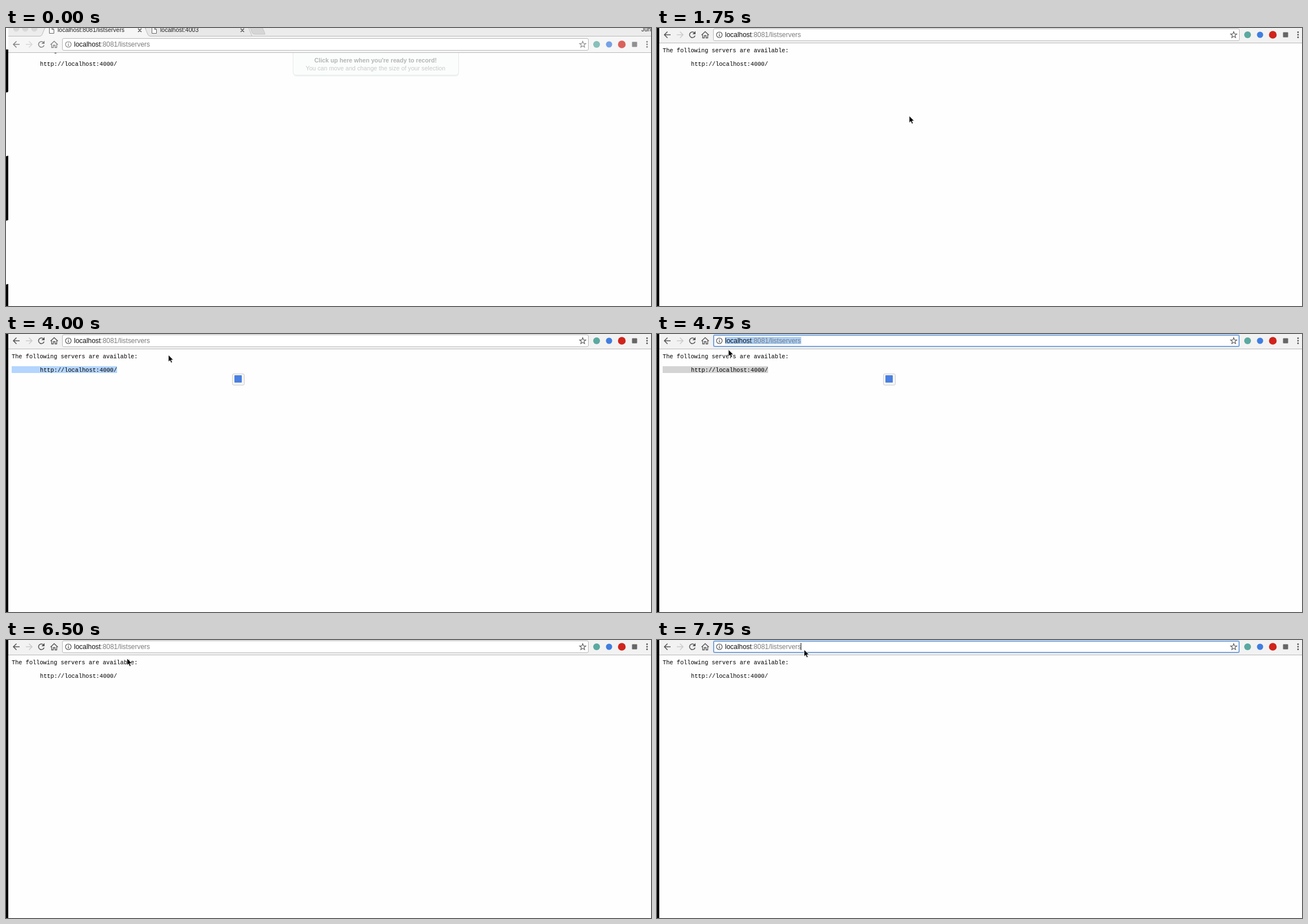
Recreate the animation shown at these times as an HTML page. Size 1138x492 px, loop 8 s.

```html
<!DOCTYPE html>
<html lang="en">
<head>
<meta charset="utf-8">
<title>Server list</title>
<style>
  html, body { margin: 0; width: 100%; height: 100%; overflow: hidden; background: #fefefe; }
  svg { display: block; width: 1138px; height: 492px; }
  text { font-family: "Liberation Sans", Arial, sans-serif; white-space: pre; }
  .mono { font: 10.3px "Liberation Mono", "Courier New", monospace; }
  .line { fill: none; stroke: #555; stroke-width: 1.5; }
</style>
</head>
<body>
<svg viewBox="0 0 1138 492">
  <rect width="1138" height="492" fill="#fefefe"/>

  <g id="page">
    <rect id="mark" x="10" y="57" width="186" height="12"/>
    <text class="mono" x="10" y="43">The following servers are available:</text>
    <text class="mono" x="60" y="66.5">http://localhost:4000/</text>
  </g>
  <g id="badge">
    <rect x="399.5" y="70.5" width="21" height="20" rx="2.5" fill="#f5f5f5" stroke="#cfcfcf"/>
    <rect x="403" y="73" width="13" height="13" rx="1" fill="#4a80e0"/>
  </g>

  <g id="tip">
    <rect x="507" y="46" width="292" height="40" rx="6" fill="#e9eef0" opacity=".6"/>
    <rect x="506.5" y="36.5" width="292" height="47" rx="5" fill="#fbfcfc" stroke="#e4e8ea"/>
    <g text-anchor="middle" font-size="10.68">
      <text x="652" y="61" font-weight="bold" fill="#b4b4b4">Click up here when you're ready to record!</text>
      <text x="652" y="74.5" fill="#c9c9c9">You can move and change the size of your selection</text>
    </g>
  </g>

  <g id="chrome">
    <g id="tabs">
      <rect y="-20" width="1138" height="18" fill="#ececec"/>
      <g fill="#d9d9d9" stroke="#cccccc" stroke-width=".5">
        <circle cx="18" cy="-16" r="5"/><circle cx="34" cy="-16" r="5"/><circle cx="50" cy="-16" r="5"/>
      </g>
      <path d="M242-2.5 247-18H428L434-2.5" fill="#e8e8e8" stroke="#bdbdbd"/>
      <path d="M431-18H452Q456-11 457-6H439Q435-6 434-9Z" fill="#d6d6d6" stroke="#c2c2c2"/>
      <path d="M0-2.5H60Q63-3 64-6L69-18H245L250-6Q251-3 254-2.5H1138V0H0Z" fill="#f6f6f6"/>
      <path d="M0-2.5H60Q63-3 64-6L69-18M245-18 250-6Q251-3 254-2.5H1138" fill="none" stroke="#bababa"/>
      <g fill="#fff" stroke="#666">
        <path d="M76.500-18H81L84.500-14.500V-7.500H76.500ZM81-18V-14.500H84.500"/>
        <path d="M257.500-18H262L265.500-14.500V-7.500H257.500ZM262-18V-14.500H265.500"/>
      </g>
      <g font-size="10.5" fill="#222">
        <text x="91" y="-10">localhost:8081/listservers</text>
        <text x="272" y="-10">localhost:4003</text>
        <text x="1121" y="-11">Jun</text>
      </g>
      <path d="M233-16l6 6m0-6-6 6M414-16l6 6m0-6-6 6" class="line" stroke-width="1.2"/>
    </g>
    <rect id="bar" y="-2" width="1138" height="28"/>
    <path d="M0 26.500H1138" stroke="#b9b9b9"/>
    <rect id="field" fill="#fff"/>
    <g id="icons">
      <path class="line" d="M24 12H13.500M18.500 6.500 13 12l5.500 5.500"/>
      <path class="line" style="stroke:#ccc" d="M35 12H45.500M40.500 6.500 46 12l-5.500 5.500"/>
      <g id="reload">
        <path class="line" d="M66 8.500A5 5 0 1 0 67.200 13.500"/>
        <path d="M68 5.500V11H62.500Z" fill="#555"/>
      </g>
      <path id="stop" class="line" d="M58 7.500l9 9m0-9-9 9"/>
      <path class="line" style="stroke-width:1.300" d="M78.500 12.500 85 6.500l6.500 6M80.500 11.500V17.500H83.500V13.500H86.500V17.500H89.500V11.500"/>
      <circle class="line" style="stroke-width:1.200" cx="110" cy="12" r="5"/>
      <path d="M110 11V15M110 8.500V10" stroke="#555" stroke-width="1.300"/>
      <path id="star" class="line" style="stroke-width:1.100"/>
      <circle cx="1042" cy="12" r="6" fill="#5aa9a0"/>
      <circle cx="1064" cy="12" r="5.500" fill="#3f7ee0"/>
      <circle cx="1086.500" cy="12" r="6.800" fill="#d0241c"/>
      <rect x="1104.500" y="7.500" width="9" height="9" rx="1" fill="#666"/>
      <g fill="#555">
        <circle cx="1131" cy="7.500" r="1.400"/><circle cx="1131" cy="12" r="1.400"/><circle cx="1131" cy="16.500" r="1.400"/>
      </g>
    </g>
    <rect id="urlMark" x="120" y="5" width="134.500" height="13" fill="#acd0f8"/>
    <text x="120" y="16" font-size="11.95" fill="#111">localhost<tspan fill="#7d7d7d">:8081/listservers</tspan></text>
    <rect id="caret" x="253.500" y="5" width="1" height="13"/>
  </g>

  <rect id="edge" width="4" height="492" fill="#fff"/>
  <path id="strip"/>

  <path id="cursor" d="M0 0V12.200L2.800 9.700 4.700 14.100 6.900 13.200 5 8.900H8.800Z" fill="#000" stroke="#fff" stroke-width=".8"/>
</svg>
<script>
  const LOOP = 8000, STEP = 250;
  const $ = id => document.getElementById(id);
  const set = (id, attrs) => { for (const k in attrs) $(id).setAttribute(k, attrs[k]); };
  const show = (id, on) => set(id, { visibility: on ? "visible" : "hidden" });

  // pointer way points: time, x, y
  const way = [
    [500, 494, 186], [750, 486, 177.5], [1250, 478, 170], [1500, 478, 170], [1750, 445, 155.5],
    [2250, 448, 136], [2500, 448, 136], [2750, 432, 124], [3250, 403, 100], [3750, 391, 59],
    [4250, 182, 15], [4500, 182, 15], [4750, 126, 27.5], [5750, 150, 31], [6250, 150, 31],
    [6500, 213.5, 32.5], [6750, 222, 38], [7250, 256, 20], [7500, 259.5, 17]
  ];

  function pointer(t) {
    const i = way.findIndex(p => p[0] > t);
    if (i < 0) return way[way.length - 1].slice(1);
    if (i === 0) return null;
    const [a, ax, ay] = way[i - 1], [b, bx, by] = way[i];
    const k = (t - a) / (b - a);
    return [ax + (bx - ax) * k, ay + (by - ay) * k];
  }

  const star = Array.from({ length: 10 }, (_, i) => {
    const r = i % 2 ? 2.5 : 5.8, a = (i / 5 - 0.5) * Math.PI;
    return (1017.5 + r * Math.cos(a)).toFixed(2) + " " + (12.3 + r * Math.sin(a)).toFixed(2);
  });
  set("star", { d: "M" + star.join("L") + "Z" });

  function draw(ms) {
    const t = Math.floor((ms % LOOP) / STEP) * STEP;
    const within = (a, b) => t >= a && t < b;
    const active = t >= 1750;
    const focus = within(4750, 5500) || t >= 7250;
    const loading = within(5750, 6000);

    const slide = Math.max(0, 1 - t / 500);
    set("chrome", { transform: `translate(0 ${Math.round(17 * slide)})` });
    set("tip", { opacity: slide });
    show("tabs", slide > 0);

    set("bar", { fill: active ? "#f2f2f2" : "#f6f6f6" });
    set("icons", { opacity: active ? 1 : 0.7 });
    set("field", focus
      ? { x: 100, y: 2, width: 927, height: 20, rx: 2, stroke: "#78a5dc", "stroke-width": 2 }
      : { x: 99.5, y: 1.5, width: 928, height: 21, rx: 2.5, stroke: "#b8b8b8", "stroke-width": 1 });
    show("urlMark", focus && t < 7750);
    show("caret", t >= 7750);
    show("reload", !loading);
    show("stop", loading);

    show("page", !loading);
    show("mark", within(3750, 5750));
    set("mark", { fill: t < 4750 ? "#b4d5fe" : "#d4d4d4" });
    show("badge", within(4000, 5750));

    set("strip", { d: t < STEP
      ? "M0 38H4V112Q4 113 2 114H0ZM0 227 4 226V340L0 341ZM0 454 4 453V492H0Z"
      : "M0 0H4V492H0Z" });

    const p = pointer(t);
    show("cursor", p);
    if (p) set("cursor", { transform: `translate(${p[0]} ${p[1]})` });
  }

  const start = performance.now();
  function tick() {
    draw(performance.now() - start);
    requestAnimationFrame(tick);
  }
  draw(0);
  requestAnimationFrame(tick);
</script>
</body>
</html>
```
